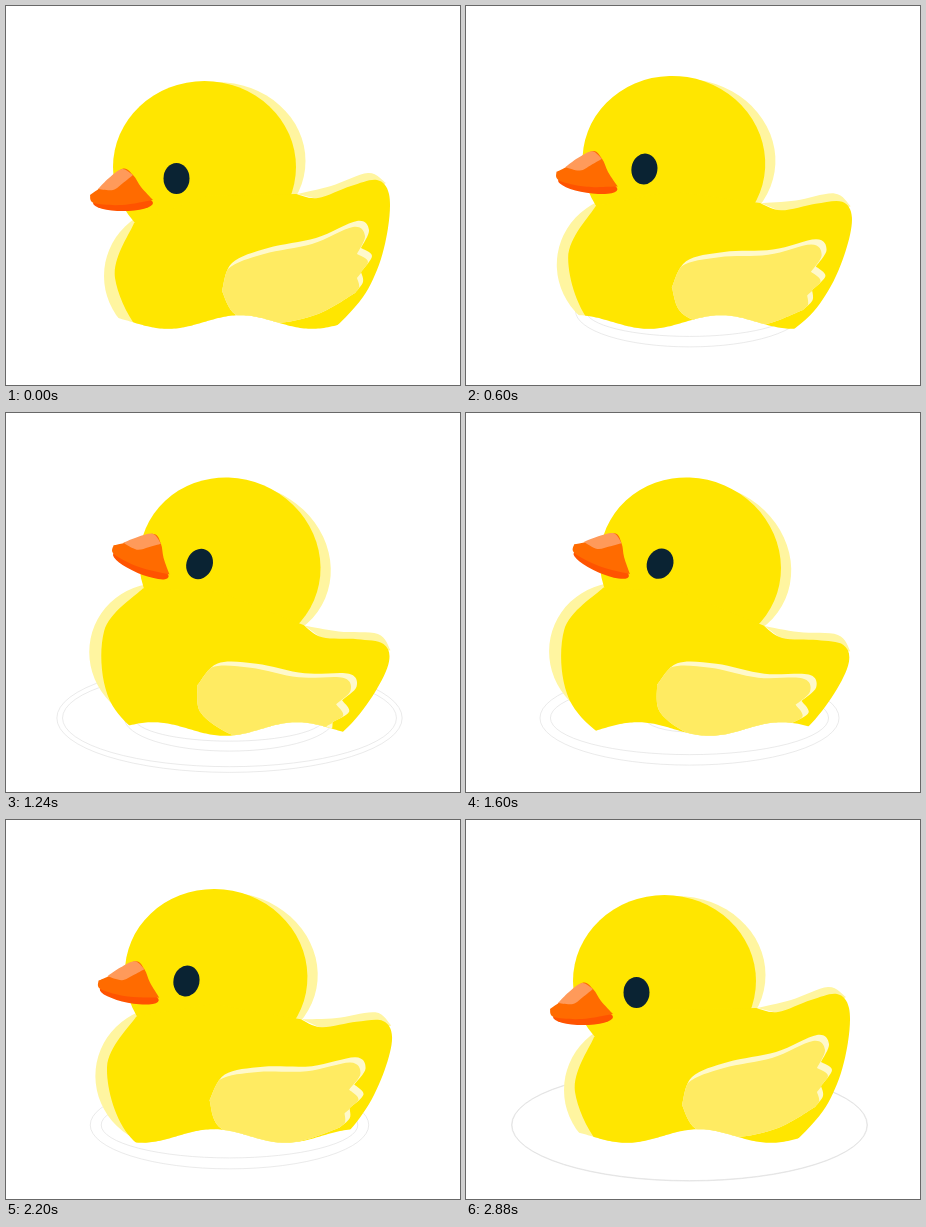
Animation of 454 by 379 pixels, one loop 2920 ms. Source, as an HTML page with a canvas:

```html
<!DOCTYPE html>
<html lang="en">
<head>
<meta charset="utf-8">
<title>Rubber duck</title>
<style>
html, body { margin: 0; width: 100%; height: 100%; overflow: hidden; background: #fff; }
canvas { display: block; }
</style>
</head>
<body>
<canvas id="stage" width="454" height="379"></canvas>
<script>
const ctx = document.getElementById('stage').getContext('2d');
const W = 454, H = 379, LOOP = 2920, STEP = 40, TAU = Math.PI * 2;
const PIVOT = { x: 234.8, y: 218.3 };
const TILT = 24.2 * Math.PI / 180;
const YELLOW = '#ffe600', PALE = '#fff5a0';

// Closed outline from smooth runs of x,y pairs; corners fall where runs meet.
function shape(...runs) {
  const path = new Path2D();
  runs.forEach((run, r) => {
    const last = run.length / 2 - 1;
    const at = i => {
      const k = Math.max(0, Math.min(last, i)) * 2;
      return [run[k], run[k + 1]];
    };
    path[r ? 'lineTo' : 'moveTo'](run[0], run[1]);
    for (let i = 0; i < last; i++) {
      const [a, b, c, d] = [at(i - 1), at(i), at(i + 1), at(i + 2)];
      path.bezierCurveTo(
        b[0] + (c[0] - a[0]) / 6, b[1] + (c[1] - a[1]) / 6,
        c[0] - (d[0] - b[0]) / 6, c[1] - (d[1] - b[1]) / 6,
        c[0], c[1]);
    }
  });
  path.closePath();
  return path;
}

function oval(x, y, rx, ry) {
  const path = new Path2D();
  path.ellipse(x, y, rx, ry, 0, 0, TAU);
  return path;
}

function paint(color, path) {
  ctx.fillStyle = color;
  ctx.fill(path);
}

const tailRim = shape([291, 188, 325, 180, 362, 167, 380, 177], [340, 200]);
const body = shape(
  [290, 188, 312, 192, 345, 180, 371, 174, 383, 188, 382, 222, 371, 264,
    349, 301, 300, 342, 225, 358, 146, 337, 109, 272, 128, 217],
  [200, 190]);
const wing = shape(
  [216, 285, 226, 257, 262, 242, 310, 232, 351, 215, 363, 224, 355, 242],
  [355, 242, 366, 250, 355, 266],
  [355, 266, 357, 276, 349, 287],
  [349, 287, 312, 308, 268, 317, 230, 309, 216, 285]);
const beak = shape(
  [84, 189, 95, 181, 116, 163, 127, 169, 135, 181, 147, 194],
  [147, 194, 116, 199, 88, 197, 84, 189]);
const shine = shape(
  [92, 183, 103, 172, 116, 163, 127, 169],
  [127, 169, 117, 177, 107, 184, 92, 183]);

function drawWing() {
  paint('#fff9cb', wing);
  ctx.save();
  ctx.clip(wing);
  ctx.translate(-4, 6);
  paint('#ffeb62', wing);
  ctx.restore();
}

function drawDuck() {
  paint(PALE, oval(211, 155, 88.5, 79));
  paint(PALE, oval(170, 270, 72, 70));
  paint(PALE, tailRim);
  paint(YELLOW, oval(198.5, 161, 91.5, 86));
  paint(YELLOW, body);
  drawWing();
  paint('#ff5300', oval(117, 197, 30, 8));
  paint('#ff6b00', beak);
  paint('#ff9a5a', shine);
  paint('#0a2333', oval(170.5, 172.5, 13, 15.5));
}

function drawRipple(age) {
  const u = age / 1500;
  if (u <= 0 || u >= 1) return;
  const rx = 178 * (1 - (1 - u) ** 2);
  const ry = rx * 0.315;
  const band = Math.min(11 * Math.sin(Math.PI * u), ry * 0.8);
  ctx.strokeStyle = '#dcdcdc';
  ctx.lineWidth = 0.6;
  for (const inset of [0, band]) ctx.stroke(oval(223.5, 305, rx - inset, ry - inset));
}

function clipToWater(p) {
  const length = 144;
  const trough = 162 + length * p - 9 * Math.sin(TAU * p);
  ctx.beginPath();
  ctx.moveTo(0, 0);
  ctx.lineTo(W, 0);
  for (let x = W; x >= 0; x -= 2) {
    ctx.lineTo(x, 316 + 6.8 * Math.cos((x - trough) / length * TAU));
  }
  ctx.closePath();
  ctx.clip();
}

function draw(t) {
  ctx.fillStyle = '#fff';
  ctx.fillRect(0, 0, W, H);
  for (let i = 0; i < 3; i++) drawRipple(t - i * 700);

  ctx.save();
  clipToWater(t / LOOP);
  ctx.translate(PIVOT.x, PIVOT.y);
  ctx.rotate(TILT * (1 - Math.cos(t / (LOOP - STEP) * TAU)) / 2);
  ctx.translate(-PIVOT.x, -PIVOT.y);
  drawDuck();
  ctx.restore();
}

function tick() {
  draw(Math.floor(performance.now() % LOOP / STEP) * STEP);
  requestAnimationFrame(tick);
}
tick();
</script>
</body>
</html>
```
